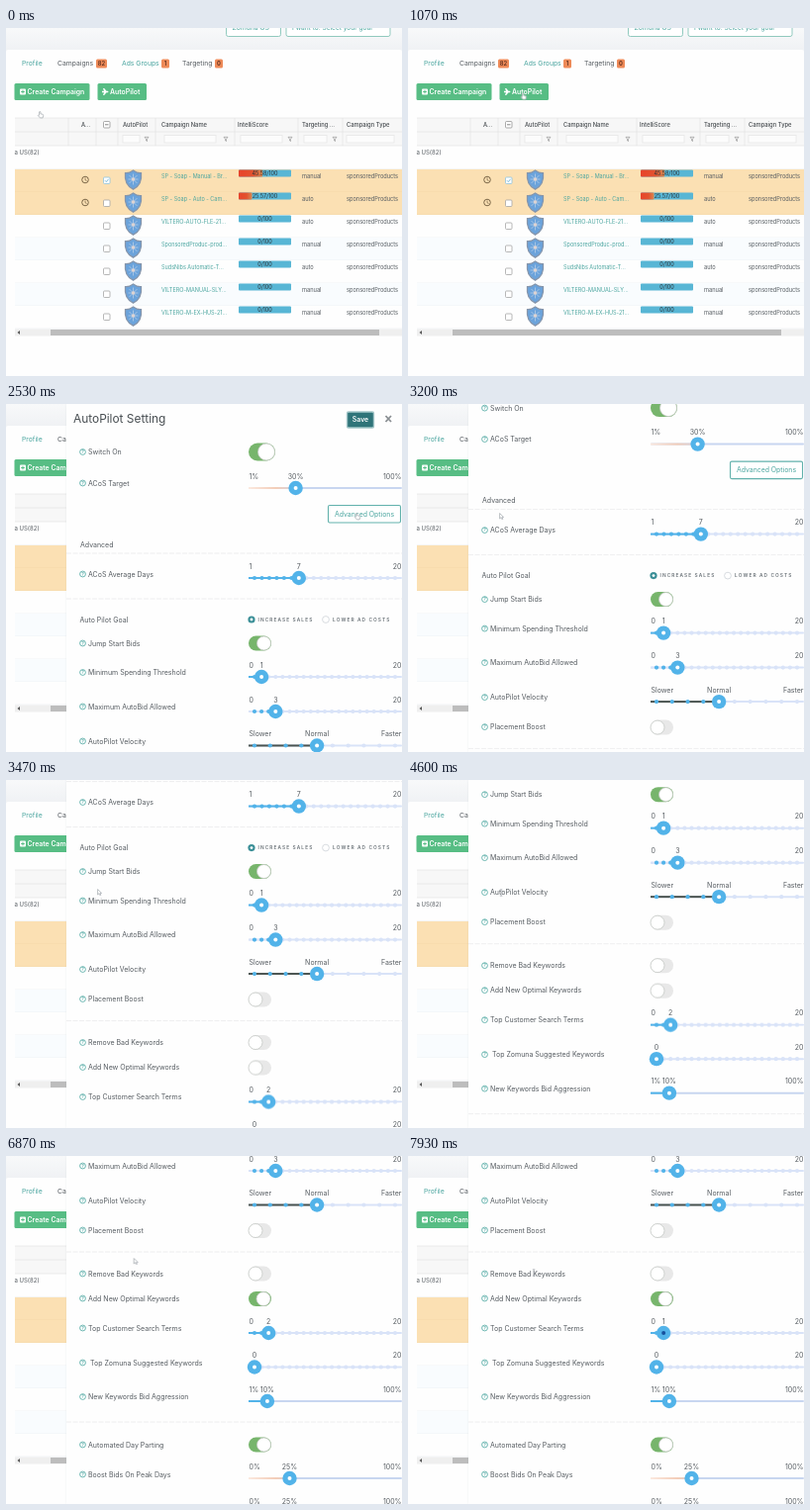
Animation of 400 by 352 pixels, one loop 8000 ms. Source, as an HTML page:

```html
<!DOCTYPE html>
<html lang="en">
<head>
<meta charset="utf-8">
<title>AutoPilot settings</title>
<style>
html, body { margin: 0; width: 400px; height: 352px; overflow: hidden; background: #fefefe; }
body { position: relative; font-family: Inter, Roboto, sans-serif; }
svg { display: block; position: absolute; top: 0; left: 0; overflow: visible; }
text { white-space: pre; }
#panel {
  position: absolute; left: 61px; top: 0; width: 339px; height: 120px; overflow: hidden;
  background: #fefefe; box-shadow: 0 0 2px rgba(90, 100, 120, .1);
  animation: slide 8s infinite, grow 8s infinite;
}
#form { left: -61px; animation: scroll 8s linear infinite; }
#cursor { animation: move 8s infinite; }
#spin { transform-origin: 238px 172px; animation: spin 8s linear infinite, wait 8s step-end infinite; }
.focus { animation: focus 8s step-end infinite; }
.hand { animation: hand 8s step-end infinite; }
.arrow { animation: arrow 8s step-end infinite; }
.beam { animation: beam 8s step-end infinite; }
.flip .track { animation: track 8s infinite; }
.flip .knob { animation: knob 8s infinite; }
.drag .thumb { animation: drag 8s infinite; }
.drag .fill { animation: shrink 8s infinite; transform-origin: 245px 0; }
.drag .core { animation: core 8s step-end infinite; }
.drag .was { animation: was 8s step-end infinite; }
.drag .now { animation: now 8s step-end infinite; }

@keyframes slide {
  0%, 15.9% { transform: translateX(345px); animation-timing-function: cubic-bezier(.165, .84, .44, 1); }
  22.25%, 100% { transform: none; }
}
@keyframes grow {
  0%, 26.6% { height: 120px; animation-timing-function: ease-out; }
  31.6%, 100% { height: 352px; }
}
@keyframes scroll {
  0%, 38.4% { transform: translateY(0); }
  40% { transform: translateY(-44px); }
  43.37% { transform: translateY(-149px); }
  45.9%, 56.75% { transform: translateY(-215px); }
  57.5% { transform: translateY(-227px); }
  60%, 100% { transform: translateY(-296px); }
}
@keyframes move {
  0%, 1.4% { transform: translate(32px, 84px); }
  4.1%, 10.4% { transform: translate(40px, 84px); }
  14%, 16% { transform: translate(115px, 65px); }
  19.5%, 22% { transform: translate(154px, 73px); }
  26%, 32% { transform: translate(352px, 110px); }
  35.9%, 62% { transform: translate(92px, 110px); }
  70%, 73% { transform: translate(121px, 83px); }
  78%, 85.5% { transform: translate(128px, 103px); }
  86.6%, 88% { transform: translate(129px, 103px); }
  90%, 96.5% { transform: translate(126px, 103px); }
  98.4%, 100% { transform: translate(125px, 114px); }
}
@keyframes spin {
  0%, 15% { transform: rotate(-170deg); }
  20.87% { transform: rotate(0deg); }
  22%, 100% { transform: rotate(33deg); }
}
@keyframes wait { 0% { opacity: 0; } 15% { opacity: .8; } 21.6%, 100% { opacity: 0; } }
@keyframes focus { 0% { stroke: #c3dcdc; } 26%, 100% { stroke: #62b1ac; } }
@keyframes hand { 0%, 24%, 66% { opacity: 1; } 15%, 33%, 78%, 100% { opacity: 0; } }
@keyframes arrow { 0%, 24%, 46%, 66%, 97%, 100% { opacity: 0; } 15%, 33%, 58%, 78% { opacity: 1; } }
@keyframes beam { 0%, 58% { opacity: 0; } 46%, 97%, 100% { opacity: 1; } }
@keyframes track { 0%, 77.5% { fill: #e8e8e8; } 79.1%, 100% { fill: #77b56c; } }
@keyframes knob { 0%, 77.5% { transform: none; } 79.1%, 100% { transform: translateX(8px); } }
@keyframes drag { 0%, 88.4% { transform: none; } 90%, 100% { transform: translateX(-7.1px); } }
@keyframes shrink { 0%, 88.4% { transform: none; } 90%, 100% { transform: scaleX(.65); } }
@keyframes core { 0% { fill: #fff; } 89%, 100% { fill: #17509c; } }
@keyframes was { 0% { opacity: 1; } 89%, 100% { opacity: 0; } }
@keyframes now { 0% { opacity: 0; } 89%, 100% { opacity: 1; } }
</style>
</head>
<body>
<svg id="page" width="400" height="352"></svg>
<div id="panel"><svg id="form" width="400" height="680"></svg></div>
<svg id="cursor" width="12" height="12" stroke="#a0a5ab" stroke-width=".7" fill="#fff" stroke-linejoin="round">
  <path class="hand" d="M1.6 4.2V.8q.7-.7 1.3 0v2l2.2.5q.8.3.6 1.3l-.6 2.3H2.4L.3 4.5q.4-.9 1.3-.3z"/>
  <path class="arrow" d="M.6 .5V6l1.3-1.2 1 1.9.9-.5-.9-1.8h1.7z"/>
  <path class="beam" d="M.8 .8h2.6M2.1 .8v6.4M.8 7.2h2.6"/>
</svg>
<script>
const $ = id => document.getElementById(id);
const TEAL = '#4aa59f', INK = '#555b60', BLUE = '#52b3e9', RAIL = '#d9e3f8', LINE = '#e3e3e3';
const MID = 'text-anchor="middle"', END = 'text-anchor="end"';
const BOLD = 'font-weight="600"', MEDIUM = 'font-weight="500"';

const text = (x, y, s, size = 7, fill = INK, more = '') =>
  `<text x="${x}" y="${y + size * .36}" font-size="${size}" fill="${fill}" ${more}>${s}</text>`;
const rect = (x, y, w, h, fill, more = '') =>
  `<rect x="${x}" y="${y}" width="${w}" height="${h}" fill="${fill}" ${more}/>`;
const dot = (x, y, r, fill, more = '') =>
  `<circle cx="${x}" cy="${y}" r="${r}" fill="${fill}" ${more}/>`;
const path = (d, stroke, width = .7, more = 'fill="none"') =>
  `<path d="${d}" stroke="${stroke}" stroke-width="${width}" ${more}/>`;

// Campaign page
function tab(x, label, fill, bx, count) {
  const w = String(count).length > 1 ? 11 : 8;
  return text(x, 36, label, 6.8, fill) + (bx
    ? rect(bx, 31.5, w, 9, '#ee8a58', 'rx="1.5"') + text(bx + w / 2, 36, count, 5.8, '#5a2c1c', MID + ' ' + BOLD)
    : '');
}

function tableHead() {
  let s = rect(9, 91, 391, 28, '#f7f7f7') + path('M9 91H400M9 105H400M9 119H400', LINE);
  for (const x of [63, 91, 113, 151, 231, 295, 340]) s += path(`M${x} 91V119`, LINE);
  const heads = [[76, 'A...'], [118, 'AutoPilot'], [157, 'Campaign Name'], [234, 'IntelliScore'],
    [299, 'Targeting ...'], [344, 'Campaign Type']];
  for (const [x, h] of heads) s += text(x, 98, h, 5.8, '#474c50', MEDIUM);
  s += rect(98.5, 94.5, 6.5, 6.5, '#fff', 'rx="1" stroke="#888" stroke-width=".7"') +
    path('M100 97.8h3.5', '#666', .8);
  for (const [x, w] of [[118, 17], [160, 52], [237, 42], [301, 23], [344, 48]])
    s += rect(x, 108.5, w, 7.5, '#fcfcfc', 'stroke="#e2e2e2" stroke-width=".6"');
  for (const x of [142, 222, 287, 332]) s += path(`M${x - 2} 110.3h4l-1.5 2v2.2l-1-.6v-1.6z`, '#888', .6);
  return s;
}

function shield(x, y) {
  return path(`M${x} ${y - 9.5}q4 3 8 2.6q1.3 12-8 16.6q-9.3-4.6-8-16.6q4 .4 8-2.6z`, '#8595ab', 1.3, 'fill="#6ba3db"') +
    path(`M${x - 4} ${y - 4.5}l8 8m0-8l-8 8M${x} ${y - 6}v11M${x - 5} ${y - .5}h10`, '#bdd3ea', .7) +
    dot(x, y - .5, 1.8, '#dcd3d2');
}

function row([name, kind, score], i) {
  const y = 143 + 23 * i, hot = i < 2;
  let s = rect(9, y, 391, 23, hot ? '#fbe0b3' : i % 2 ? '#f9fcfe' : '#fefefe') +
    path(`M9 ${y + 23}H400`, hot ? '#f1d5a4' : '#ebf0f3');
  if (hot) s += dot(80, y + 10.5, 3.3, 'none', 'stroke="#6d5a3c" stroke-width=".9"') +
    path(`M80 ${y + 8.5}v2.2l1.5 .8`, '#6d5a3c');
  s += rect(98.5, y + 8, 6.5, 6.5, '#fff', `rx="1" stroke="${i ? '#a5a5a5' : '#8fc3dd'}" stroke-width=".8"`);
  if (!i) s += path(`M100 ${y + 11.3}l1.3 1.3 2.3-2.8`, '#5aa9d0', .8);
  s += shield(128.5, y + 10.5) + text(157, y + 7, name, 5.5, TEAL) +
    rect(235, y + .6, 53, 7, '#58b6d5', 'rx="1"');
  if (score) s += rect(235, y + .6, 53 * score / 100, 7, 'url(#heat)', 'rx="1"');
  return s + text(261.5, y + 4, `${score}/100`, 5.5, '#2c3338', MID) +
    text(299, y + 7, kind, 5.7) + text(344, y + 7, 'sponsoredProducts', 5.65);
}

const rows = [
  ['SP - Soap - Manual - Br...', 'manual', 45.58], ['SP - Soap - Auto - Cam...', 'auto', 25.57],
  ['VILTERO-AUTO-FLE-21...', 'auto', 0], ['SponsoredProduc-prod...', 'manual', 0],
  ['SudsNibs Automatic-T...', 'auto', 0], ['VILTERO-MANUAL-SLY...', 'manual', 0],
  ['VILTERO-M-EX-HUS-21...', 'manual', 0]
];

const select = (x, w, s, size) =>
  rect(x, -10, w, 18.5, '#fff', 'rx="2" stroke="#86c4b8" stroke-width=".9"') + text(x + 6, 0, s, size, TEAL);
const button = (x, w, tx, s) => rect(x, 56, w, 17, '#57bd84', 'rx="1.5"') + text(tx, 64.5, s, 6.9, '#fff', BOLD);

$('page').innerHTML =
  `<defs><linearGradient id="heat"><stop stop-color="#e8432a"/><stop offset=".6" stop-color="#e2532f"/>
    <stop offset="1" stop-color="#d98a52"/></linearGradient>
  <linearGradient id="top" x2="0" y2="1"><stop stop-color="#f8f9fa"/><stop offset="1" stop-color="#eff1f4"/></linearGradient></defs>` +
  rect(0, 0, 400, 24, 'url(#top)') + rect(0, 22, 400, 330, '#fefefe', 'rx="2"') +
  select(222.5, 55, 'Zomuna US', 6.8) + select(283, 105, 'I want to: Select your goal', 6.6) +
  tab(16, 'Profile', TEAL) + tab(52, 'Campaigns', INK, 91, 82) +
  tab(117, 'Ads Groups', TEAL, 157, 1) + tab(178, 'Targeting', INK, 211, 0) +
  button(8.5, 76, 21.5, 'Create Campaign') + rect(14, 61.5, 6, 6, '#fff', 'rx="1"') +
  path('M17 62.7v3.6M15.2 64.5h3.6', '#57bd84', 1) +
  button(92.5, 49.5, 105, 'AutoPilot') +
  path('M97 63.7h2l-1-2.7h1.2l2.3 2.7h1.5q1 .8 0 1.6h-1.5l-2.3 2.7h-1.2l1-2.7h-2z', 'none', 0, 'fill="#fff"') +
  tableHead() + text(8.5, 126, 'a US(82)', 6) + path('M9 143H400', LINE) +
  rows.map(row).join('') +
  rect(9, 304.5, 391, 7, '#efefef') + rect(45, 305, 332, 6, '#bdbdbd') +
  path('M14 306l-2.5 2 2.5 2z', 'none', 0, 'fill="#555"') +
  `<g id="spin" stroke-linecap="round">${
    path('M268 153Q241 122 221 152Q209 186 240 211', '#7b9fd0', 1.1)}${
    path('M203 184Q201 151 250 149Q268 151 272 165', '#a9bcd6', .9)}</g>`;

// Settings form
const label = (y, s, x = 83) => dot(77.5, y, 2.9, '#fff', `stroke="${TEAL}" stroke-width=".8"`) +
  text(77.5, y, '?', 4.8, TEAL, MID + ' ' + BOLD) + text(x, y, s);

function toggle(y, on, cls = '', h = 15, w = 23) {
  const r = h / 2;
  return `<g class="${cls}">` +
    rect(245, y - r, w, h, on ? '#77b56c' : '#e8e8e8', `class="track" rx="${r}"`) +
    dot(on ? 245 + w - r : 252, y, r - .5, '#fff', 'class="knob" stroke="#c4c8c4" stroke-width=".8"') + '</g>';
}

const at = p => 251 + 142 * p;

function slider(y, p, { ticks = 0, ends = ['0', '20'], value = '', fill = BLUE, cls = '', next } = {}) {
  const x = at(p), ny = y - 12;
  let s = rect(245, y - 1, 155, 2, ticks ? RAIL : '#c8d6f0', 'rx="1"') +
    rect(245, y - 1, x - 245, 2, fill, 'class="fill"');
  for (let i = 0; i <= ticks && ticks; i++) {
    const tx = at(i / ticks);
    s += dot(tx, y, 2.1, tx < x ? BLUE : RAIL);
  }
  s += `<g class="thumb">${dot(x, y, 7.2, BLUE)}${dot(x, y, 2, '#fff', 'class="core"')}</g>`;
  if (p) s += text(245.5, ny, ends[0]);
  s += text(399.5, ny, ends[1], 7, INK, END) + text(x, ny, value, 7, INK, MID + ' class="was"');
  if (next) s += text(at(next / 20), ny, next, 7, INK, MID + ' class="now"');
  return `<g class="${cls}">${s}</g>`;
}

const rule = y => path(`M61 ${y}H400`, '#ececee', .9, 'stroke-dasharray="5 1.5"');
const caps = (x, y, s) => text(x, y, s, 4.8, '#687076', BOLD + ' letter-spacing="1.1"');
const percent = (value, low = '0%') => ({ ends: [low, '100%'], value, fill: 'url(#warm)' });
const count = value => ({ ticks: 20, value });

$('form').innerHTML =
  `<defs><linearGradient id="warm" gradientUnits="userSpaceOnUse" x1="245" x2="300">
    <stop stop-color="#fbe9df"/><stop offset=".5" stop-color="#f3cdb8"/><stop offset="1" stop-color="#c8d6f0"/></linearGradient></defs>` +
  text(68, 14.3, 'AutoPilot Setting', 11.9, '#484e52') +
  rect(344.5, 8, 27, 16, '#2f7479', 'rx="1.5" stroke="#a3c6c8" stroke-width="1.4"') +
  text(358, 16, 'Save', 6.9, '#fff', MID + ' ' + BOLD) +
  path('M383.5 12l5.5 6m0-6l-5.5 6', '#8a8f93', 1.8) +
  label(48.5, 'Switch On') + toggle(48.5, true, '', 18, 27) +
  label(80, 'ACoS Target') + slider(85, 29 / 99, percent('30%', '1%')) +
  rect(325.5, 102.5, 73, 17.5, '#fff', 'class="focus" rx="1.5" stroke-width="1.1"') +
  text(362, 111.3, 'Advanced Options', 6.9, TEAL, MID) +
  text(75, 142, 'Advanced') + rule(151) +
  label(172, 'ACoS Average Days') + slider(176, 6 / 19, { ticks: 19, ends: ['1', '20'], value: '7' }) +
  rule(197) + text(74.5, 218, 'Auto Pilot Goal') +
  dot(248, 218, 3.6, '#3b8f97') + dot(248, 218, 1.4, '#fff') +
  caps(254.5, 218, 'INCREASE SALES') +
  dot(323, 218, 3.4, '#fff', 'stroke="#cfd4d8" stroke-width=".8"') + caps(330, 218, 'LOWER AD COSTS') +
  label(242, 'Jump Start Bids') + toggle(242, true) +
  label(271.5, 'Minimum Spending Threshold') + slider(276, 1 / 20, count('1')) +
  label(306, 'Maximum AutoBid Allowed') + slider(311, 3 / 20, { ...count('3'), fill: RAIL }) +
  label(341, 'AutoPilot Velocity') +
  slider(345.5, 4 / 9, { ticks: 9, ends: ['Slower', 'Faster'], value: 'Normal', fill: '#4b5450' }) +
  label(371, 'Placement Boost') + toggle(371.5, false) + rule(393) +
  label(415, 'Remove Bad Keywords') + toggle(415, false) +
  label(440, 'Add New Optimal Keywords') + toggle(440.5, false, 'flip') +
  label(470, 'Top Customer Search Terms') +
  slider(475, 2 / 20, { ...count('2'), cls: 'drag', next: 1 }) +
  label(505, 'Top Zomuna Suggested Keywords', 85) + slider(509.5, 0, count('0')) +
  label(539.5, 'New Keywords Bid Aggression') + slider(544, 9 / 99, { ...percent('10%', '1%'), fill: BLUE }) +
  rule(565) + label(588, 'Automated Day Parting') + toggle(588, true) +
  label(618, 'Boost Bids On Peak Days') + slider(622, .25, percent('25%')) +
  slider(657, .25, percent('25%'));
</script>
</body>
</html>
```
